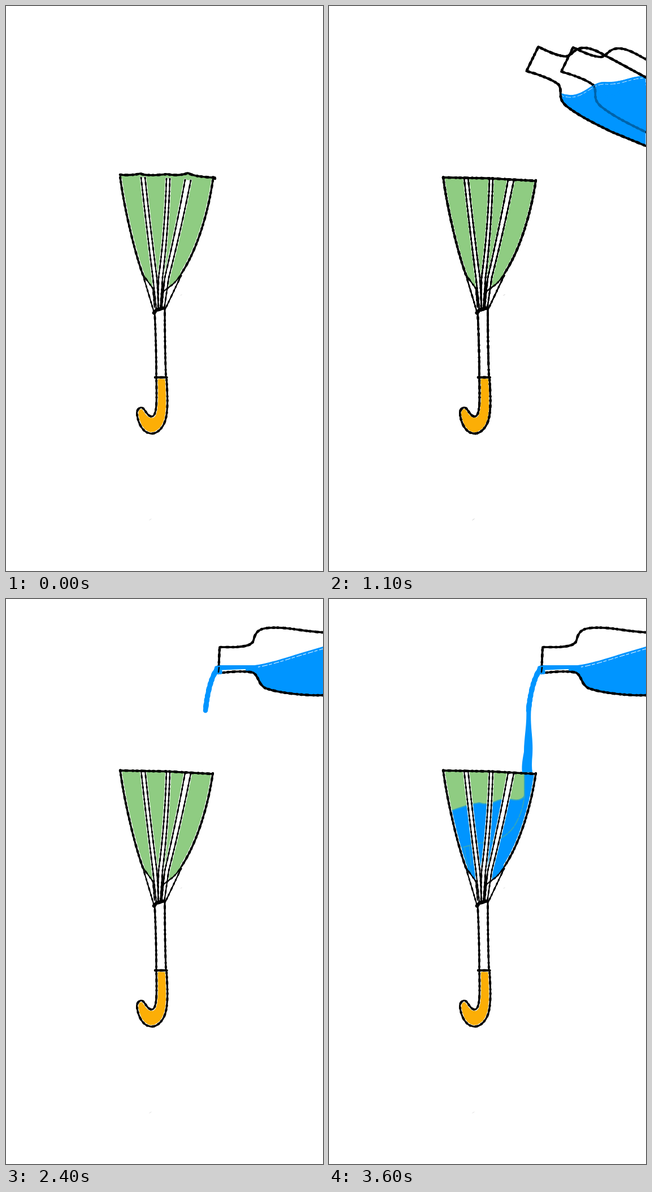
Animation, 561 px wide and 998 px high, one loop 3800 ms. Source, as an HTML page with a canvas:

```html
<!DOCTYPE html>
<html lang="en">
<head>
<meta charset="utf-8">
<title>Umbrella and bottle</title>
<style>
  html, body { margin: 0; height: 100%; overflow: hidden; background: #fff; }
  canvas { display: block; width: 100vw; height: 100vh; }
</style>
</head>
<body>
<canvas id="stage" width="561" height="998"></canvas>
<script>
const W = 561, H = 998, LOOP = 3800, KEY = 400, STEP = 100;
const GREEN = '#8fcc82', BLUE = '#0095ff', ORANGE = '#fcae06', INK = '#000';

const RIM = {
  wavy: 'M202 298 Q220 300 238 296 Q248 301 285 297 Q306 301 322 295 Q334 302 370 303',
  flat: 'M202 303 L285 304.5 L366 309'
};
const RIGHT_EDGE = 'C358 365 338 430 312 470';
const LEFT_EDGE = 'M242 474 C226 430 208 350 202 302';
const CANOPY_SIDES = ` L366 308 ${RIGHT_EDGE} Q302 488 288 497 L260 499 L242 474 C226 430 208 350 202 302 Z`;

// Each rib edge: top x, top y, control x, control y, x at y 480, foot x
const RIBS = [
  [[239, 303, 248, 385, 260, 266], [246, 303, 255, 388, 267, 270]],
  [[284, 305, 281, 400, 270, 269], [290, 305, 287, 400, 277, 273]],
  [[317, 307, 302, 390, 281, 274], [327, 308, 311, 390, 288, 280]]
];
const STRUTS = 'M242 474 L262 541 M242 474 L260 499 L263 532 M310 476 L283 533 M312 470 Q302 488 288 497 L279 504';
const SHAFT = 'M263 540 Q266 600 266 655 M281 533 Q281 600 283 655';
const HANDLE = 'M266 656 L284 656 C286 690 287 715 282 732 C277 748 265 757 255 755 ' +
  'C242 753 234 738 232 722 C230 713 238 706 243 711 C248 716 251 726 259 725 C267 722 267 700 266 656 Z';

const TILTED = 'M622 127 L561 94 C545 86 528 74 510 75 C494 76 492 89 481 90 C468 90 450 82 432 73 L411 116 ' +
  'C430 121 458 131 468 140 C476 152 464 163 482 178 C505 196 535 210 561 223 L622 248';
const LEVEL = 'M561 59 C515 56 500 49 465 51 C446 52 441 60 438 73 C436 81 425 84 405 85 L378 85 L376 131 ' +
  'C400 128 425 127 437 130 C447 135 446 150 458 157 C480 166 530 171 561 170';

const SURFACE = {
  tilted: 'M472 155 Q490 162 507 154 C522 147 534 134 550 135 C580 137 592 125 622 124',
  low: 'M424 122 L440 122 C455 117 472 101 492 92 Q525 79 561 62',
  rising: 'M424 119 L440 119 C458 115 480 105 500 97 Q530 86 561 73',
  pouring: 'M424 118 L440 117 C465 114 500 102 520 96 L561 84'
};
const NECK = 'M370 117 L446 117 L446 123 L370 126 Z';

const POUR = 'M374 123 C362 140 356 168 353 197';
const FALL = 'M349 190 C351 220 345 245 345 270 Q340 295 342 306 L360 306 Q358 295 360 275 C362 245 355 225 358 190 Z';
const CHUTE = 'M346 304 L346 345 Q344 375 328 401 Q317 417 300 424';
const POOL = {
  low: CHUTE + ' C285 430 262 430 233 440',
  high: 'M346 304 L346 348 Q340 358 322 354 Q306 352 294 358 Q280 365 266 360 Q246 363 214 375'
};

const KEYS = [
  { rim: 'wavy' },
  { rim: 'flat' },
  { bottle: TILTED, water: 'tilted' },
  { bottle: TILTED, water: 'tilted', shift: [-61.5, -1] },
  { bottle: LEVEL, water: 'low' },
  { bottle: LEVEL, water: 'rising', neck: true },
  { bottle: LEVEL, water: 'pouring', neck: true, pour: true },
  { bottle: LEVEL, water: 'pouring', neck: true, pour: true, fall: true },
  { bottle: LEVEL, water: 'pouring', neck: true, pour: true, fall: true, pool: 'low' },
  { bottle: LEVEL, water: 'pouring', neck: true, pour: true, fall: true, pool: 'high' }
];

function fill(c, d, color) {
  c.fillStyle = color;
  c.fill(new Path2D(d));
}

function stroke(c, d, width, color = INK, dash = []) {
  c.lineWidth = width;
  c.strokeStyle = color;
  c.setLineDash(dash);
  c.stroke(new Path2D(d));
}

// A pen line with slightly uneven edges
function pen(c, d, width = 3.6, color = INK) {
  stroke(c, d, width - 0.5, color);
  stroke(c, d, width + 0.5, color, [2, 7, 4, 9, 1, 6]);
}

function withMode(c, mode, paint) {
  c.save();
  c.globalCompositeOperation = mode;
  paint();
  c.restore();
}

const erase = (c, paint) => withMode(c, 'destination-out', paint);
const ribEdge = ([x, y, cx, cy, lowX, footX]) => `M${x} ${y} Q${cx} ${cy} ${lowX} 480 L${footX} 535`;
const ribShape = ([a, b]) =>
  `${ribEdge(a)} L${b[5]} 535 L${b[4]} 480 Q${b[2]} ${b[3]} ${b[0]} ${b[1]} Z`;

function drawPool(c, level) {
  withMode(c, 'source-atop', () => {
    fill(c, POOL[level] + ' L250 510 L320 510 L390 304 Z', BLUE);
    stroke(c, POOL[level], 2, '#30a7c6');
    stroke(c, 'M240 440 Q241 465 253 483 M249 436 L251 470', 1.2, '#30a4c4');
    if (level === 'high') stroke(c, POOL.low, 2, '#30a4c0', [14, 3]);
  });
}

function drawUmbrella(c, { rim = 'flat', pool }) {
  const edges = RIBS.flat().map(ribEdge);
  const sides = `${LEFT_EDGE} M366 308 ${RIGHT_EDGE}`;
  fill(c, RIM[rim] + CANOPY_SIDES, GREEN);
  if (pool) drawPool(c, pool);
  fill(c, HANDLE, ORANGE);
  erase(c, () => {
    RIBS.forEach(rib => fill(c, ribShape(rib), INK));
    edges.forEach(d => stroke(c, d, 4.6));
    stroke(c, sides, 6, INK, [5, 4, 9, 3]);
    stroke(c, HANDLE, 5.4, INK, [5, 4, 9, 3]);
  });
  edges.forEach(d => pen(c, d, 2.5));
  pen(c, sides, 3.8);
  pen(c, STRUTS, 2.6);
  pen(c, SHAFT, 3.5);
  pen(c, HANDLE, 3.6);
  pen(c, 'M264 656 L285 656', 4);
  pen(c, 'M262 542 L266 537 L281 533', 6);
  pen(c, 'M279 492 L275 532', 4);
  pen(c, RIM[rim], 4.2);
  if (rim === 'wavy') pen(c, 'M366 303 L370 305', 5);
  stroke(c, 'M254 908 L257 906 M309 511 L311 510', 1, '#ddd');
}

function drawBottle(c, { bottle, water, shift = [0, 0], neck, pour, fall }) {
  c.save();
  c.translate(...shift);
  c.save();
  c.clip(new Path2D(bottle));
  fill(c, SURFACE[water] + ' V300 H424 Z', BLUE);
  erase(c, () => {
    c.translate(0, 4);
    stroke(c, SURFACE[water], 1, INK, [5, 4, 9, 3]);
  });
  if (neck) fill(c, NECK, BLUE);
  c.restore();
  pen(c, bottle, 4.2);
  c.restore();
  if (fall) fill(c, FALL, BLUE);
  if (pour) {
    pen(c, POUR, 9, BLUE);
    stroke(c, 'M373 122 L384 121 M375 129 L379 129', 8, BLUE);
    stroke(c, 'M377 121 L376 129', 2.5);
  }
}

function makeLayer(key) {
  const layer = document.createElement('canvas');
  layer.width = W;
  layer.height = H;
  const c = layer.getContext('2d');
  c.lineCap = c.lineJoin = 'round';
  drawUmbrella(c, key);
  if (key.bottle) drawBottle(c, key);
  return layer;
}

const layers = KEYS.map(makeLayer);
const view = document.getElementById('stage').getContext('2d');

function put(layer, alpha = 1) {
  view.globalAlpha = alpha;
  view.drawImage(layer, 0, 0);
}

// Lines stay solid during a change; only overlapping colours mix.
function render(time) {
  const t = time % LOOP;
  const index = Math.floor(t / KEY);
  const step = Math.max(0, Math.floor((t % KEY) / STEP) - 1);
  view.globalAlpha = 1;
  view.fillStyle = '#fff';
  view.fillRect(0, 0, W, H);
  if (step) {
    put(layers[index + 1]);
    put(layers[index]);
    put(layers[index + 1], step / 3);
  } else {
    put(layers[index]);
  }
}

const start = performance.now();
function tick() {
  render(performance.now() - start);
  requestAnimationFrame(tick);
}
tick();
</script>
</body>
</html>
```
